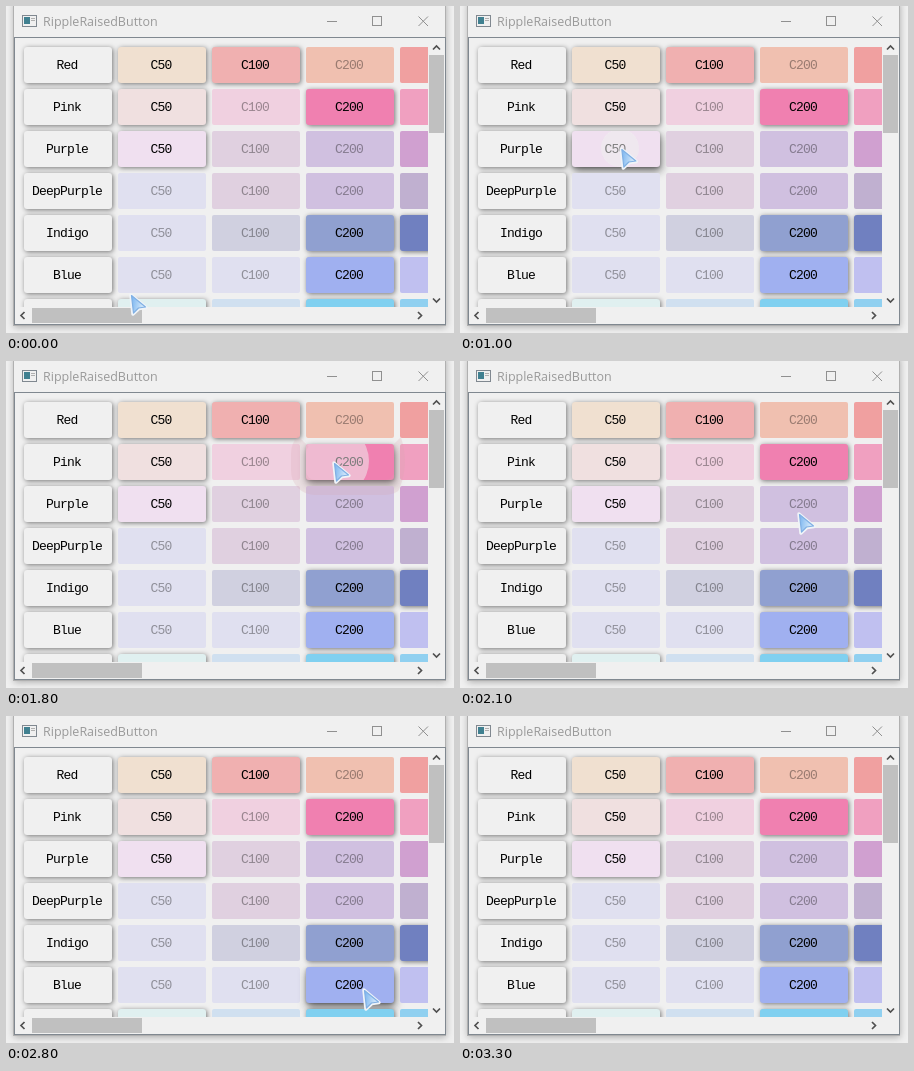
Recreate the animation shown at these times as an HTML page. Size 448 by 327 pixels, loop 3.4 s.

```html
<!DOCTYPE html>
<html lang="en">
<head>
<meta charset="utf-8">
<title>Ripple buttons</title>
<style>
  html, body { margin: 0; width: 100%; height: 100%; overflow: hidden; background: #f0f0f0; }
  #stage { position: relative; width: 448px; height: 327px; overflow: hidden; background: #f0f0f0; }
  #window {
    position: absolute; left: 8px; top: -4px; width: 432px; height: 324px;
    background: #f0f0f0; box-shadow: 0 1px 7px rgba(0, 0, 0, .3);
  }
  svg { position: absolute; left: 0; top: 0; overflow: visible; }
  #view { position: absolute; left: 9px; top: 32px; width: 413px; height: 269px; overflow: hidden; }
  #grid { position: absolute; left: -9px; top: -32px; }
  .button {
    position: absolute; width: 88px; height: 36px; border-radius: 2px; overflow: hidden;
    font: 13px/38px "Liberation Mono", monospace; letter-spacing: -.8px; text-indent: -2px;
    text-align: center; white-space: pre; color: rgba(0, 0, 0, .36);
  }
  .raised { color: #000; border-radius: 3px; box-shadow: 1px 1px 5px rgba(0, 0, 0, .52); }
  .lifted { box-shadow: 1px 4px 8px rgba(0, 0, 0, .55), 0 1px 3px rgba(0, 0, 0, .25); }
  .ripple { position: absolute; border-radius: 50%; background: #f0f0f0; }
  .halo { position: absolute; width: 88px; height: 36px; border: 15px solid transparent; border-radius: 24px; }
</style>
</head>
<body>
<div id="stage">
  <div id="window"></div>
  <svg width="448" height="327" fill="none">
    <g shape-rendering="crispEdges">
      <rect x="16.5" y="9.5" width="14" height="11" fill="#f0f0f0" stroke="#808890"/>
      <rect x="18" y="11" width="6" height="7" fill="#408090"/>
      <path d="M25 12.5H29M25 14.5H29" stroke="#b0b0b0"/>
      <path d="M321 15.5H331M366.5 10.5H375.5V19.5H366.5Z" stroke="#909090"/>
      <path d="M8.5 31.5H439.5V318.5H8.5Z" stroke="#808890"/>
      <path d="M7.5 0V319.5H440" stroke="#b0b0b0"/>
      <path d="M439.5 0V31" stroke="#b0b0b0"/>
      <path d="M423 49H438V127H423ZM26 302H136V317H26Z" fill="#c0c0c0"/>
    </g>
    <path d="M412.500 10.500L422 20M422 10.500L412.500 20" stroke="#909090"/>
    <path d="M427 43.500L430.500 40L434 43.500M427 292.500L430.500 296L434 292.500M18.500 306L15 309.500L18.500 313M412 306L415.500 309.500L412 313"
          stroke="#505050" stroke-width="1.7"/>
    <text x="37" y="20" font-family="'Open Sans', sans-serif" font-size="12.5" fill="#999">RippleRaisedButton</text>
  </svg>
  <div id="view"><div id="grid"></div></div>
  <svg id="cursor" width="20" height="26">
    <defs>
      <linearGradient id="ice" x1="0" y1=".4" x2="1" y2=".6">
        <stop offset="0" stop-color="#80b8f0"/>
        <stop offset="1" stop-color="#e4f2fc"/>
      </linearGradient>
    </defs>
    <path d="M1 3L16 15.500L9 16.500L3 22Z" stroke="#f0f4f8" fill="none" stroke-width="3.5" stroke-linejoin="round"/>
    <path d="M1.500 3.500L15.500 15L8.500 16L3.500 21Z" fill="url(#ice)" stroke="#80b0e4" stroke-width="1.2" stroke-linejoin="round"/>
  </svg>
</div>
<script>
const LOOP = 3400, STEP = 100;
const grid = document.getElementById("grid");
const cursor = document.getElementById("cursor");

// Label, then one colour per column; "+" marks an enabled, raised button.
const rows = [
  ["Red", "+f0e0d0", "+f0b0b0", "f0c0b0", "f0a0a0"],
  ["Pink", "+f0e0e0", "f0d0e0", "+f080b0", "f0a0c0"],
  ["Purple", "+f0e0f0", "e0d0e0", "d0c0e0", "d0a0d0"],
  ["DeepPurple", "e0e0f0", "e0d0e0", "d0c0e0", "c0b0d0"],
  ["Indigo", "e0e0f0", "d0d0e0", "+90a0d0", "+7080c0"],
  ["Blue", "e0e0f0", "e0e0f0", "+a0b0f0", "c0c0f0"],
  ["LightBlue", "+e0f0f0", "d0e0f0", "+80d0f0", "90d0f0"]
];

// Pointer: time, x, y
const path = [
  [0, 124, 286], [100, 127, 262], [300, 138, 175], [400, 145, 135], [600, 148, 112],
  [800, 152, 120], [900, 158, 138], [1200, 165, 144], [1400, 200, 129],
  [1600, 318, 102], [1700, 327, 99], [1800, 327, 99], [1900, 328, 104],
  [2100, 338, 150], [2300, 351, 224], [2400, 352, 230], [2500, 352, 230],
  [2600, 353, 236], [2800, 357, 271], [3000, 357, 273], [3100, 357, 273], [3200, 361, 287]
];

const ripples = [
  { row: 1, col: 1, x: 148, y: 114, start: 400, speed: .215, tint: "rgba(240,180,196,.45)", sides: "top right" },
  { row: 2, col: 1, x: 160, y: 142, start: 900, speed: .19, tint: "rgba(230,200,230,.3)", sides: "" },
  { row: 1, col: 3, x: 327, y: 100, start: 1600, speed: .18, tint: "rgba(212,165,175,.22)", sides: "left right bottom" },
  { row: 4, col: 3, x: 353, y: 231, start: 2300, speed: .18, tint: "rgba(240,240,240,.4)", sides: "" },
  { row: 5, col: 3, x: 358, y: 273, start: 2800, speed: .185, tint: "rgba(190,218,245,.5)", sides: "left right" }
];

const left = col => 18 + 94 * col;
const rowTop = row => 41 + 42 * row;

function add(parent, className, x, y) {
  const el = document.createElement("div");
  el.className = className;
  el.style.left = x + "px";
  el.style.top = y + "px";
  return parent.appendChild(el);
}

const buttons = rows.map((row, r) => row.map((cell, c) => {
  const raised = c === 0 || cell[0] === "+";
  const el = add(grid, "button" + (raised ? " raised" : ""), left(c), rowTop(r));
  el.style.background = c ? "#" + cell.replace("+", "") : "#f0f0f0";
  el.textContent = c ? "C" + [50, 100, 200, 300][c - 1] : cell;
  return { el, raised, x: left(c), y: rowTop(r) };
}));

for (const r of ripples) {
  const button = buttons[r.row][r.col];
  r.dx = r.x - button.x;
  r.dy = r.y - button.y;
  r.disc = add(button.el, "ripple", 0, 0);
  r.halo = add(grid, "halo", button.x - 15, button.y - 15);
  for (const side of r.sides.split(" ").filter(Boolean))
    r.halo.style.setProperty(`border-${side}-color`, r.tint);
}

function pointerAt(t) {
  const i = path.findIndex(p => p[0] >= t);
  if (i < 0) return null;
  const b = path[i], a = path[Math.max(0, i - 1)];
  const k = b[0] === a[0] ? 0 : (t - a[0]) / (b[0] - a[0]);
  return [a[1] + (b[1] - a[1]) * k, a[2] + (b[2] - a[2]) * k];
}

function drawRipple(r, t) {
  const age = t - r.start;
  const on = age > 0 && age < 500;
  r.disc.style.display = r.halo.style.display = on ? "block" : "none";
  if (!on) return;
  const radius = age * r.speed;
  const fade = Math.min(1, (500 - age) / 300);
  Object.assign(r.disc.style, {
    left: r.dx - radius + "px", top: r.dy - radius + "px",
    width: 2 * radius + "px", height: 2 * radius + "px", opacity: .52 * fade
  });
  r.halo.style.opacity = age < 200 ? .4 : fade;
  r.halo.style.clipPath = `circle(${radius * 2}px at ${r.dx + 15}px ${r.dy + 15}px)`;
}

function draw(now) {
  let t = Math.floor((now % LOOP) / STEP) * STEP;
  if (t === 700 || t === 1300) t -= STEP; // the picture rests here
  const at = pointerAt(t);
  cursor.style.display = at ? "block" : "none";
  if (at) cursor.style.transform = `translate(${at[0]}px, ${at[1]}px)`;
  for (const b of buttons.flat()) {
    const over = at && b.raised && at[0] >= b.x && at[0] < b.x + 88 && at[1] >= b.y && at[1] < b.y + 36;
    b.el.classList.toggle("lifted", !!over);
  }
  for (const r of ripples) drawRipple(r, t);
}

const begin = performance.now();
function tick() {
  draw(performance.now() - begin);
  requestAnimationFrame(tick);
}
tick();
</script>
</body>
</html>
```
